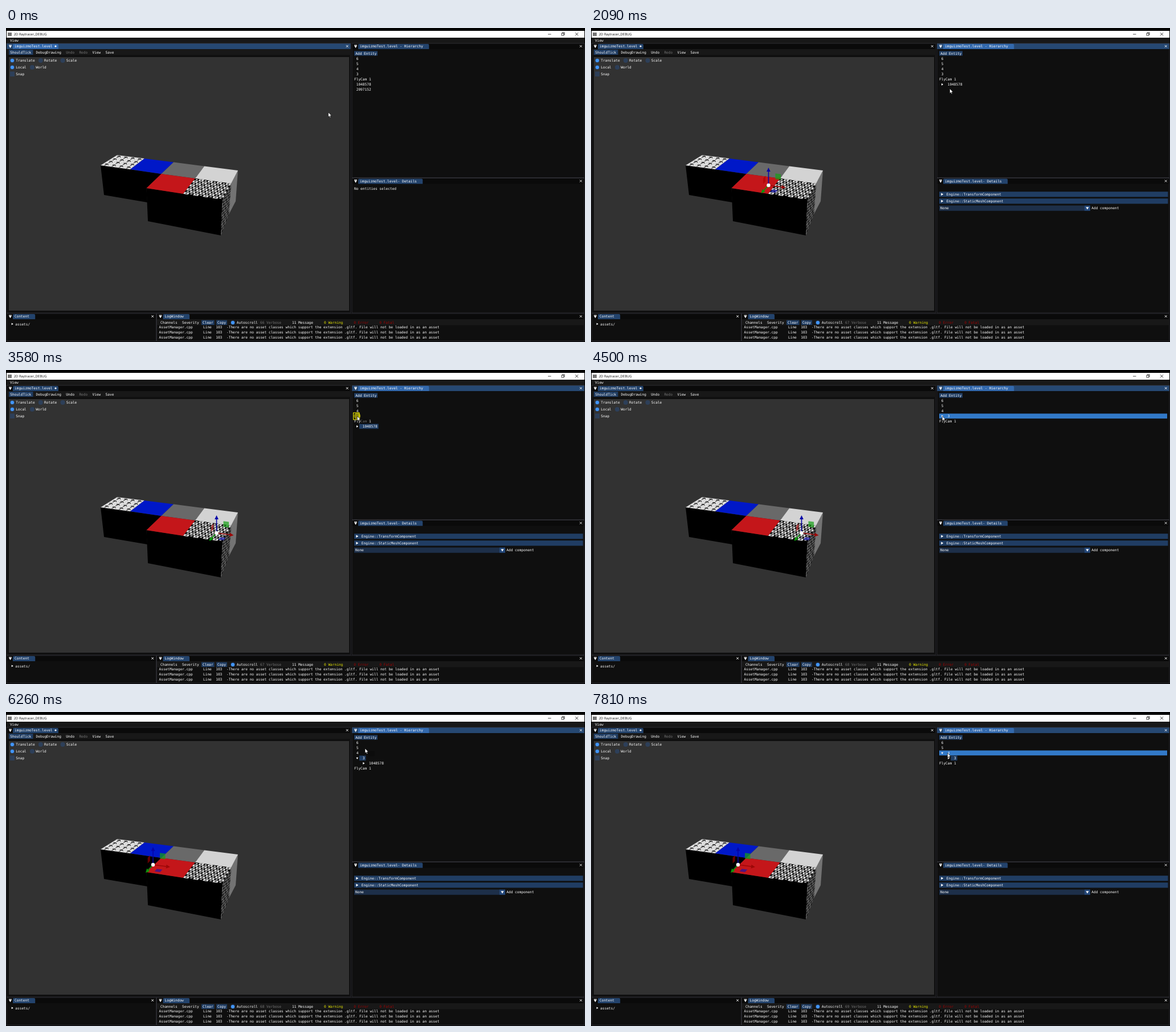
An HTML page with a canvas for the animation above (8 s loop, 1016 by 551 pixels).

```html
<!DOCTYPE html>
<html lang="en">
<head>
<meta charset="utf-8">
<title>Level editor</title>
<style>
html, body { margin: 0; width: 100%; height: 100%; overflow: hidden; background: #000; }
canvas { display: block; }
</style>
</head>
<body>
<canvas id="stage" width="1016" height="551"></canvas>
<script>
const ctx = document.getElementById('stage').getContext('2d');
const LOOP = 8000, CHAR = 3.7;
const MONO = '6.15px "DejaVu Sans Mono", monospace';
const BG = '#0f0f0f', BAR = '#181818', GREY = '#747474';
const DIM = '#203d63', HOVER = '#3279c8', ACTIVE = '#4296fa', FRAME = 'rgba(41,74,122,.54)';

ctx.textRendering = 'geometricPrecision';

// Drawing helpers
function box(x0, y0, x1, y1, color) {
  ctx.fillStyle = color;
  ctx.fillRect(x0, y0, x1 - x0, y1 - y0);
}
function outline(x, y, w, h, color, width = 0.8) {
  ctx.strokeStyle = color;
  ctx.lineWidth = width;
  ctx.strokeRect(x, y, w, h);
}
function poly(points, color) {
  ctx.fillStyle = color;
  ctx.beginPath();
  points.forEach(([x, y]) => ctx.lineTo(x, y));
  ctx.closePath();
  ctx.fill();
}
function line(x0, y0, x1, y1, color, width = 1) {
  ctx.strokeStyle = color;
  ctx.lineWidth = width;
  ctx.beginPath();
  ctx.moveTo(x0, y0);
  ctx.lineTo(x1, y1);
  ctx.stroke();
}
function dot(x, y, r, color) {
  ctx.fillStyle = color;
  ctx.beginPath();
  ctx.arc(x, y, r, 0, 7);
  ctx.fill();
}
// y is the middle of the text row
function text(s, x, y, color = '#fff', font = MONO) {
  ctx.font = font;
  ctx.fillStyle = color;
  ctx.fillText(s, x, y + 2.2);
}
// Labels in a row, each placed after the one before
function flow(x, y, gap, labels, before = () => {}) {
  labels.forEach(([s, color], i) => {
    before(x, s.length * CHAR, i);
    text(s, x, y, color);
    x += s.length * CHAR + gap;
  });
}
function cross(x, y, r, color = '#fff') {
  line(x - r, y - r, x + r, y + r, color, 0.9);
  line(x + r, y - r, x - r, y + r, color, 0.9);
}
function arrow(x, y, open, r = 2) {
  poly(open ? [[x - r, y - r * .7], [x + r, y - r * .7], [x, y + r]]
            : [[x - r * .7, y - r], [x + r, y], [x - r * .7, y + r]], '#fff');
}
function radio(x, y, on) {
  dot(x, y, 4, FRAME);
  if (on) dot(x, y, 3.1, ACTIVE);
}
const mix = (a, b, k) => a + (b - a) * k;
const smooth = k => k * k * (3 - 2 * k);

// Each gesture ends in a change; later steps keep what they do not replace.
// In a tree "+" is a closed row, "-" an open one, ">" a child.
const steps = [
  { press: 0, release: 0, tree: ' 6| 5| 4| 3|FlyCam 1| 1048578| 2097152' },
  { press: 890, release: 970, picked: ' 2097152', gizmo: [311.5, 276] },
  { press: 1350, release: 1950, tree: ' 6| 5| 4| 3|FlyCam 1|+ 1048578' },
  { press: 2620, release: 2700, picked: ' 1048578', gizmo: [369.5, 286] },
  { press: 2950, release: 3900, tree: ' 6| 5| 4|+ 3|FlyCam 1' },
  { press: 4520, release: 4600, tree: ' 6| 5| 4|- 3|>+ 1048578|FlyCam 1' },
  { press: 5160, release: 5300, picked: ' 3', gizmo: [258, 268] },
  { press: 5650, release: 6500, tree: ' 6| 5|+ 4|FlyCam 1' },
  { press: 7400, release: 7500, tree: ' 6| 5|- 4|>+ 3|FlyCam 1' }
];
const isDrag = s => s.release - s.press > 400;

// Pointer moves: start, end, x, y
const moves = [
  [0, 0, 565.5, 148], [60, 220, 598, 122.5], [360, 880, 628.5, 108.5], [1110, 1200, 622.5, 106.5],
  [1340, 1800, 628, 99], [1940, 2080, 629.5, 106.5], [2100, 2350, 636, 101], [2540, 3300, 630, 78],
  [3360, 3580, 616.3, 81], [4600, 4830, 627.3, 80.5], [5500, 6260, 630, 64], [6330, 6480, 619.5, 73],
  [7000, 7090, 616.5, 74], [7340, 7810, 625.5, 72]
];
function pointerAt(t) {
  const i = moves.findLastIndex(m => m[0] <= t), [from, to, x, y] = moves[i];
  if (t >= to) return [x, y];
  const [, , x0, y0] = moves[i - 1], k = smooth((t - from) / (to - from));
  return [mix(x0, x, k), mix(y0, y, k)];
}

function parseRow(source, i) {
  const [, child, mark, name] = source.match(/^(>?)([+-]?)(.*)$/);
  const x = 611 + (child ? 11.3 : 0) + (mark ? 11 : 0);
  return { name, mark, x, y: 54 + 9 * i, left: x - 2, right: x + name.length * CHAR + 2 };
}
function stateAt(t) {
  const done = steps.filter(s => s.release <= t);
  const state = Object.assign({}, ...done);
  const held = steps.find(s => s.press <= t && t < s.release);
  const [x, y] = pointerAt(t);
  const rows = state.tree.split('|').map(parseRow);
  return {
    ...state, x, y, rows, held,
    edits: done.filter(isDrag).length,
    dragging: held && isDrag(held),
    focused: t >= steps[1].press,
    over: rows.find(r => Math.abs(y - r.y) < 4.6 && x < r.right && x >= (r.mark ? 611 : r.left))
  };
}

// Docked panel with one tab
function panel(x0, y0, x1, y1, title, focused) {
  const tabEnd = x0 + 24.3 + title.length * CHAR;
  box(x0, y0, x1, y1, BG);
  box(x0, y0, x1, y0 + 10, focused ? '#264872' : '#0a0a0a');
  ctx.fillStyle = focused ? '#3369ad' : '#23436c';
  ctx.beginPath();
  ctx.roundRect(x0 + 11, y0 + 1, tabEnd - x0 - 11, 9, [2, 2, 0, 0]);
  ctx.fill();
  box(x0 + 4, y0 + 2.6, x0 + 9, y0 + 3.6, '#fff');
  arrow(x0 + 6.5, y0 + 5.8, true, 2.4);
  text(title, x0 + 14, y0 + 5.2);
  cross(x1 - 6.3, y0 + 5, 1.9);
  outline(x0, y0, x1 - x0, y1 - y0, '#34343a');
}

function titleBar() {
  box(1, 5, 1015, 17, '#fff');
  box(3, 8, 10, 14, '#777');
  text('2D Raytracer_DEBUG', 13.7, 11, '#111', '5.9px "Open Sans", sans-serif');
  line(951, 11, 956.5, 11, '#222', 0.8);
  outline(976.2, 8, 3.8, 3.8, '#222');
  box(974.8, 9, 979, 13.2, '#fff');
  outline(975, 9.2, 3.8, 3.8, '#222');
  cross(1001.5, 10.8, 2.5, '#222');
  box(1, 17, 1015, 27, BAR);
  text('View', 7, 22);
}

// Textured faces: points at u, v inside a quad
const at = ([a, b, c, d], u, v) => [0, 1].map(i => mix(mix(a[i], b[i], u), mix(d[i], c[i], u), v));
const patch = (q, u, v, w, h) => [at(q, u, v), at(q, u + w, v), at(q, u + w, v + h), at(q, u, v + h)];

function grid(n, paint) {
  for (let i = 0; i < n * n; i++) paint(i % n, Math.floor(i / n));
}
function checks(q, light) {
  const n = 8, s = 1 / n;
  poly(q, '#080808');
  grid(n, (c, r) => {
    const lit = (r + c) % 2;
    if (lit) poly(patch(q, c * s, r * s, s, s), light);
    poly(patch(q, (c + .3) * s, (r + .3) * s, s * .4, s * .4), lit ? '#111' : light);
  });
}
function arrowTile(q) {
  poly(q, '#dcdcdc');
  grid(4, (c, r) => {
    const [x, y] = at(q, (c + .5) / 4, (r + .5) / 4);
    line(x - 3.5, y + 1.6, x + 2.5, y - 1.2, '#111');
    line(x - 2, y - 1.2, x + 3, y - 1, '#111');
    line(x + 2.6, y - 1.2, x + 3.4, y + 1.2, '#111');
  });
}
function scene() {
  box(5, 51, 602, 496, '#323232');
  const back = [[195, 223], [243, 229], [294, 235.5], [348, 242.5], [407, 250]];
  const mid = [[166, 241], [218, 248], [272.5, 256], [332, 264], [395, 273]];
  const front = [[246.5, 281], [311, 291], [379.5, 301]];
  const low = [[172, 293], [248, 306], [249, 339], [377, 364], [391, 327], [403, 304]];
  poly([mid[0], mid[2], front[0], low[1], low[0]], '#000');
  poly([front[0], front[2], low[3], low[2]], '#000');
  poly([back[4], low[5], low[4], mid[4]], '#737373');
  const top = i => [back[i], back[i + 1], mid[i + 1], mid[i]];
  arrowTile(top(0));
  ['#0018c8', '#696969', '#d3d3d3'].forEach((color, i) => poly(top(i + 1), color));
  poly([mid[2], mid[3], front[1], front[0]], '#c4161a');
  checks([mid[3], mid[4], front[2], front[1]], '#e8e8e8');
  checks([front[2], mid[4], low[4], low[3]], '#777');
}

function gizmo([x, y]) {
  const axes = [[30, 4], [-13, 14], [0, -31]];
  const planes = ['rgba(20,20,180,.65)', 'rgba(170,0,0,.6)', 'rgba(20,160,20,.7)'];
  const heads = ['#9c0808', '#0b990b', '#0606a8'];
  planes.forEach((color, i) => {
    const u = axes[i], v = axes[(i + 1) % 3];
    const corner = (a, b) => [x + u[0] * a + v[0] * b, y + u[1] * a + v[1] * b];
    poly([corner(.4, .4), corner(.72, .4), corner(.72, .72), corner(.4, .72)], color);
  });
  axes.forEach(([dx, dy], i) => {
    const n = Math.hypot(dx, dy), ux = dx / n, uy = dy / n;
    const bx = x + dx - ux * 7, by = y + dy - uy * 7;
    line(x, y, bx, by, heads[i], 1.6);
    poly([[x + dx, y + dy], [bx - uy * 3.4, by + ux * 3.4], [bx + uy * 3.4, by - ux * 3.4]], heads[i]);
  });
  dot(x, y, 3.2, '#fff');
}

function viewport(state) {
  panel(1, 27, 605, 500, 'imguizmoTest.level', !state.focused);
  dot(87, 32, 1.6, '#fff');
  box(1, 37, 605, 47.5, BAR);
  box(5, 38, 47.5, 47, DIM);
  flow(7.3, 42.5, 8.3, [['ShouldTick'], ['DebugDrawing'], ['Undo', state.edits ? '#fff' : GREY],
    ['Redo', GREY], ['View'], ['Save']]);
  scene();
  if (state.gizmo) gizmo(state.gizmo);
  [['Translate', 'Rotate', 'Scale'], ['Local', 'World']].forEach((labels, row) => {
    const y = 57 + 12 * row;
    flow(17.3, y, 16.5, labels.map(s => [s]), (x, w, i) => radio(x - 6.3, y, i === 0));
  });
  box(7, 76.5, 15, 85, FRAME);
  text('Snap', 17.3, 81);
}

function hierarchy({ rows, focused, picked, over, dragging, held }) {
  panel(607, 27, 1015, 262.5, 'imguizmoTest.level - Hierarchy', focused);
  box(611, 40.5, 652, 48.5, DIM);
  text('Add Entity', 613.3, 44.7);
  const pick = rows.find(r => r.name === picked);
  if (pick) box(pick.left, pick.y - 4.5, pick.right, pick.y + 4.2, DIM);
  return { rows, over, dragging, held };
}
function treeRows({ rows, over, dragging, held, x }) {
  if (over && !dragging) {
    const whole = over.mark && x < 626.5;
    box(whole ? 611 : over.left, over.y - 4.5, whole ? 1011 : over.right, over.y + 4.2, held ? ACTIVE : HOVER);
  }
  rows.forEach(r => {
    if (r.mark) arrow(r.x - 5.7, r.y, r.mark === '-', 1.9);
    text(r.name, r.x, r.y);
  });
}

function details({ picked }) {
  panel(607, 263.5, 1015, 500, 'imguizmoTest.level- Details', false);
  if (!picked) return text('No entities selected', 611, 281.3);
  ['Transform', 'StaticMesh'].forEach((name, i) => {
    const y = 291.8 + 12 * i;
    box(611, y - 4.6, 1012.5, y + 4.6, DIM);
    arrow(616, y, false, 2.4);
    text(`Engine::${name}Component`, 623.8, y);
  });
  box(611, 311.5, 866, 320.8, FRAME);
  box(866, 311.5, 876, 320.8, '#24487a');
  arrow(871, 316, true, 2.6);
  text('None', 613, 316);
  text('Add component', 878.3, 316);
}

function bottomPanels({ edits }) {
  panel(1, 501, 263.5, 549.5, 'Content', false);
  arrow(11, 519.3, false, 1.9);
  text('assets/', 16.3, 519.3);
  panel(264.5, 501, 1015, 549.5, 'LogWindow', false);
  box(265, 511, 1014.5, 521.5, BAR);
  flow(271, 517, 8.4, [['Channels'], ['Severity']]);
  flow(345, 517, 7.6, [['Clear'], ['Copy']], (x, w) => box(x - 2, 512.7, x + w + 2, 521, DIM));
  radio(398, 517, true);
  text('Autoscroll', 404.8, 517);
  flow(446, 517, 19, [[66 + edits + ' Verbose', GREY], ['11 Message'], ['0 Warning', '#e6e600'],
    ['0 Error', '#a00000'], ['0 Fatal', '#a00000']]);
  for (let y = 525; y < 550; y += 9) {
    text('AssetManager.cpp', 268.5, y);
    text('Line  103', 346, y);
    text('-There are no asset classes which support the extension .gltf. File will not be loaded in as an asset', 387, y);
  }
}

function pointer({ x, y, over, dragging, picked }) {
  if (dragging) {
    box(x + 6, y + 4.5, x + 17, y + 13.5, 'rgba(10,10,10,.6)');
    if (over && over.name !== picked) {
      dot(x, over.y - .3, 5.8, '#8f8a0a');
      outline(over.left + .5, over.y - 6, over.right - over.left - 1, 12, '#ff0', 1);
    }
  }
  const shape = [[0, 0], [0, 8.2], [1.9, 6.5], [3.2, 9.4], [4.5, 8.8], [3.3, 6], [5.8, 5.8]];
  poly(shape.map(([a, b]) => [x + a, y + b]), '#fff');
  ctx.strokeStyle = '#000';
  ctx.lineWidth = 0.6;
  ctx.stroke();
}

function draw(now) {
  const state = stateAt(now % LOOP);
  box(0, 0, 1016, 551, '#000');
  titleBar();
  viewport(state);
  hierarchy(state);
  treeRows(state);
  details(state);
  bottomPanels(state);
  pointer(state);
  requestAnimationFrame(draw);
}
requestAnimationFrame(draw);
</script>
</body>
</html>
```
